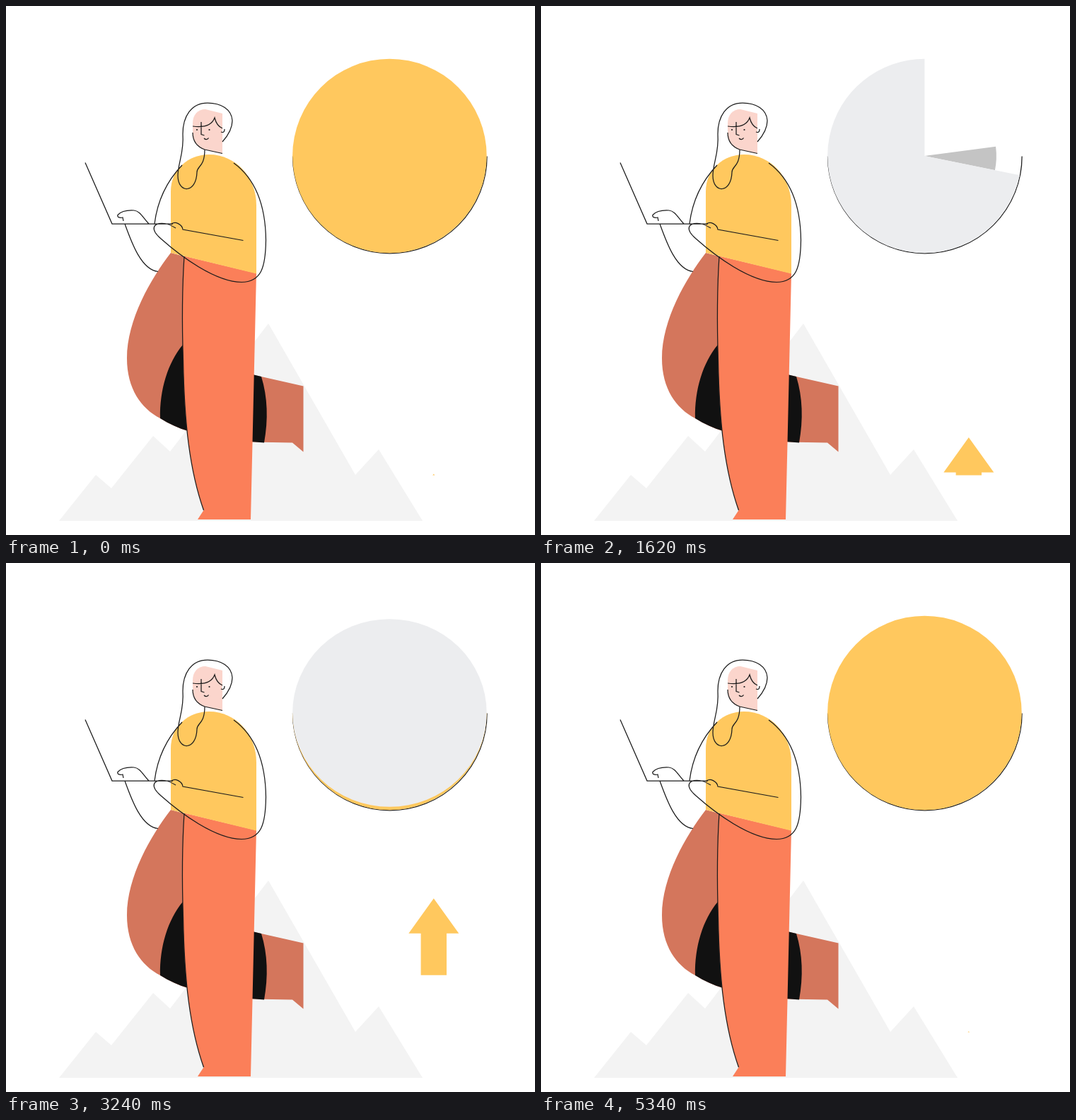
Animation, 748 px wide and 748 px high, one loop 5370 ms. Source, as an HTML page with a canvas:

```html
<!DOCTYPE html>
<html lang="en">
<head>
<meta charset="utf-8">
<title>Pie and arrow</title>
<style>
html, body { margin: 0; width: 100%; height: 100%; overflow: hidden; background: #fff; }
canvas { display: block; width: 748px; height: 748px; }
</style>
</head>
<body>
<canvas id="stage" width="748" height="748"></canvas>
<script>
const ctx = document.getElementById('stage').getContext('2d');
const LOOP = 5370, STEP = 30;
const YELLOW = '#ffc85e', GREY = '#ecedef', INK = '#1c1c1c';
const CX = 542.4, CY = 212, R = 137.3, LEAD_R = 101.5;
const TAU = Math.PI * 2, HALF = Math.PI;

const fills = [
  ['#f3f3f3', 'M75 728L127 663L149 682L208 608L232 630L371 449L494 663L527 627L589 728Z'],
  ['#d4765c', 'M233 349C205 385 171 444 171 498C171 541 191 569 218 583C231 591 244 597 257 601L348 616.500L405 617.500L420.500 630.500V537.500L352 522L252 480V354Z'],
  ['#111', 'M250 479C229 504 217 543 218 583C231 591 244 597 258 601L347 616L365 617.500C371 585 370 553 361 524L340 519Z'],
  ['#fb7f59', 'M252 353.500C249 400 249 455 250.500 501C252 590 260 658 279.500 713L271 726H346L354 378Z'],
  [YELLOW, 'M233 349V262C233 231 258 210 287 210C325 210 354 242 354 282V378.500Z'],
  ['#fbd5cc', 'M264 166C264 154 271 146 282 146L306 152V208.500L281 203C270 199 264 190 264 180Z']
].map(([color, d]) => [color, new Path2D(d)]);

const lines = new Path2D([
  // leg
  'M252 354C249 400 249 455 250.500 501C252 590 260 658 279.500 713',
  // hair and jaw
  'M306 192C315 182 320 172 320 162C319 146 304 137 285 137C262 137 250 156 250 181C252 208 243 222 243 240C243 265 269 266 270 235C270 226 281 228 281 203',
  'M264 179C264 191 270 199 281 203L306 208.500',
  // face
  'M264 170C279 172 291 169 295 158C297 166 301 171 306 173',
  'M304 178C308 180 309 177 309 174',
  'M276 164V181.500L280.500 183',
  'M280 187C282 189.500 285 189 286.500 186.500',
  // laptop
  'M112 221.500L150 308H236',
  // far hand and arm
  'M166 304L165 299C161 300 157 299 158 295.500C163 290 172 288.500 181 289C190 290 194 300 202 308',
  'M168 308C177 333 191 373 215 375.500',
  'M249 225C228 247 214 276 210 308',
  // near arm and hand
  'M322 222C355 246 367 286 367.500 331C367 370 361 390 333 390.500C296 390 247 354 219 329C203 315 208 306 224 307.500C230 308 235 311 240 314',
  'M233 309C239 303 249 309 250 316L335.500 331.500'
].join(''));

const clamp = v => Math.max(0, Math.min(1, v));
// eased progress from frame a to frame b
function ease(f, a, b) {
  const p = clamp((f - a) / (b - a));
  return p * p * (3 - 2 * p);
}

function sector(color, r, from, to) {
  if (to <= from) return;
  ctx.fillStyle = color;
  ctx.beginPath();
  ctx.moveTo(CX, CY);
  ctx.arc(CX, CY, r, from, to);
  ctx.fill();
}

function oval(color, sx, sy) {
  ctx.fillStyle = color;
  ctx.beginPath();
  ctx.ellipse(CX, CY, R * sx, R * sy, 0, 0, TAU);
  ctx.fill();
}

// half disc that grows counter-clockwise, with a short darker wedge ahead of it
function sweep(start, main, lead, color, leadColor) {
  if (lead > main) sector(leadColor, LEAD_R, start - HALF * lead, start - HALF * main);
  sector(color, R, start - HALF * main, start + HALF);
}

function drawPie(f) {
  ctx.strokeStyle = INK;
  ctx.lineWidth = 1.25;
  ctx.beginPath();
  ctx.arc(CX + 0.4, CY + 0.5, R, 0, HALF);
  ctx.stroke();

  if (f < 37) {
    const s = 1 - ease(f, 15, 37);
    if (s < 1) sector(GREY, R, HALF / 2, HALF * 1.5);
    oval(YELLOW, s, 1);
  } else if (f < 75) {
    sweep(HALF / 2, ease(f, 36.3, 75), ease(f, 35, 71), GREY, '#c4c4c4');
  } else if (f < 129.4) {
    const s = 1 - ease(f, 105.4, 129.4);
    if (s < 1) sector(YELLOW, R, 0, HALF);
    oval(GREY, 1, s);
  } else {
    const main = ease(f, 144, 178);
    if (main < 1) sweep(0, main, ease(f, 141.7, 176.7), YELLOW, '#ffbc29');
    else oval(YELLOW, 1, 1);
  }
}

function arrow(color, y) {
  ctx.fillStyle = color;
  ctx.beginPath();
  ctx.moveTo(604.8, y);
  ctx.lineTo(640.3, y + 49.5);
  ctx.lineTo(623, y + 49.5);
  ctx.lineTo(623, y + 108.5);
  ctx.lineTo(586.6, y + 108.5);
  ctx.lineTo(586.6, y + 49.5);
  ctx.lineTo(569.3, y + 49.5);
  ctx.fill();
}

// yellow accelerates upward, then grey follows quickly; four rounds per loop
function drawArrow(f) {
  const t = (f + 1) % 44.75;
  ctx.save();
  ctx.beginPath();
  ctx.rect(560, 395.5, 90, 268);
  ctx.clip();
  if (t < 28) arrow(YELLOW, 662 - 0.494 * t * t);
  else if (t > 32) arrow(GREY, 662 - 375 * ease(t, 32, 43.4));
  ctx.restore();
}

function drawFigure() {
  for (const [color, path] of fills) {
    ctx.fillStyle = color;
    ctx.fill(path);
  }
  ctx.strokeStyle = INK;
  ctx.lineWidth = 1.25;
  ctx.stroke(lines);
  ctx.fillStyle = INK;
  for (const x of [270, 287.5]) {
    ctx.beginPath();
    ctx.arc(x, 175, 1.1, 0, TAU);
    ctx.fill();
  }
}

function draw(now) {
  const f = Math.floor(((now + 0.5) % LOOP) / STEP);
  ctx.fillStyle = '#fff';
  ctx.fillRect(0, 0, 748, 748);
  drawFigure();
  drawPie(f);
  drawArrow(f);
}

let began = null;
function tick(now) {
  if (began === null) began = now;
  draw(now - began);
  requestAnimationFrame(tick);
}
draw(0);
requestAnimationFrame(tick);
</script>
</body>
</html>
```
